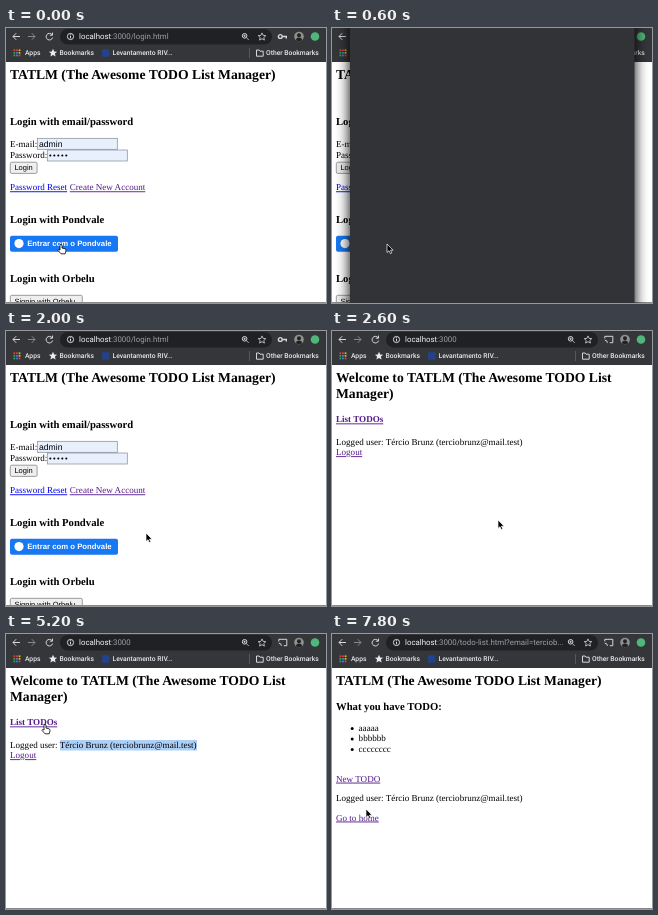
These frames come from a looping animation (320 by 275 pixels, 8 s). An HTML page:

```html
<!DOCTYPE html>
<html lang="en">
<head>
<meta charset="utf-8">
<title>TODO list demo</title>
<style>
html, body { margin: 0; width: 100%; height: 100%; overflow: hidden; background: #fff; }
svg { display: block; width: 100%; height: 100%; }
text { font: 9.07px "Liberation Serif", Times, serif; text-rendering: geometricPrecision; white-space: pre; }
.h2 { font-size: 13.63px; font-weight: bold; }
.h3 { font-size: 10.67px; font-weight: bold; }
.b { font-weight: bold; }
.link { fill: #551a8b; text-decoration: underline; text-decoration-thickness: .8px; }
.new { fill: #00e; }
.ui { font: 7.5px "Liberation Sans", Arial, sans-serif; }
.url { font: 7.85px Roboto, sans-serif; fill: #9aa0a6; }
.url tspan { fill: #f1f3f4; }
.mark { font: 500 6.75px Roboto, sans-serif; fill: #e8eaed; }
.icon { fill: none; stroke: #d5d7da; stroke-width: 1; }
.button { fill: #efefef; stroke: #767676; stroke-width: .7; }
.field { fill: #e8f0fe; stroke: #858a94; stroke-width: .7; }
#popup { filter: drop-shadow(0 0 7px #000); }
</style>
</head>
<body>
<svg viewBox="0 0 320 275" preserveAspectRatio="none">
  <rect width="320" height="275" fill="#fff"/>

  <!-- browser bars -->
  <rect width="320" height="34" fill="#35363a"/>
  <rect x="54" y="1" width="212" height="15.5" rx="7.7" fill="#202124"/>
  <g class="icon">
    <path d="M14 8.5H7M10.2 5.2L7 8.5l3.2 3.3"/>
    <path d="M22 8.5h7M25.8 5.2L29 8.5l-3.2 3.3" stroke="#85888d"/>
    <path d="M46 6.6A3.3 3.3 0 1 0 46.6 9.6M46.5 4.6V7.2H43.8"/>
    <circle cx="64.5" cy="8.5" r="3.1"/><path d="M64.5 8v2.4M64.5 6.3v1"/>
    <circle cx="238.6" cy="7.8" r="2.3"/><path d="M240.3 9.5l2.4 2.4M237.4 7.8h2.4M238.6 6.6v2.4" stroke-width=".8"/>
    <path d="M256 4.9l1.1 2.5 2.7.2-2 1.8.6 2.7-2.4-1.4-2.4 1.4.6-2.7-2-1.8 2.7-.2z" stroke-width=".8"/>
    <g id="key" stroke-width="1.4"><circle cx="274.3" cy="8.5" r="1.9"/><path d="M276.3 8.5h4v2"/></g>
    <path id="cast" d="M272.8 7.5V5.3h8v6.4h-3M272.8 9.2a2.6 2.6 0 0 1 2.6 2.6"/>
  </g>
  <circle cx="293" cy="8.5" r="4.8" fill="#8f908e"/>
  <path d="M290 12.2Q290 9.5 293 9.5T296 12.2Q293 14 290 12.2Z" fill="#222"/><circle cx="293" cy="7.3" r="2" fill="#222"/>
  <circle cx="309" cy="8.5" r="4.3" fill="#4fb779"/>
  <g id="apps"></g>
  <path d="M47 20.8l1.2 2.7 2.9.2-2.2 1.9.7 2.9-2.6-1.6-2.6 1.6.7-2.9-2.2-1.9 2.9-.2z" fill="#e8eaed"/>
  <rect x="96" y="21.3" width="7.4" height="7.4" fill="#24428a"/>
  <path class="icon" d="M250.5 22h2.5l1 1.2h3.2v5h-6.7z"/>
  <path d="M243.5 20v10" stroke="#5f6368" stroke-width=".8"/>
  <text class="mark" x="19" y="27.3">Apps</text>
  <text class="mark" x="53.5" y="27.3">Bookmarks</text>
  <text class="mark" x="106.5" y="27.3">Levantamento RIV...</text>
  <text class="mark" x="260" y="27.3">Other Bookmarks</text>
  <text class="url" x="73" y="11.3"><tspan>localhost</tspan>:3000<tspan id="path" style="fill:inherit"></tspan></text>

  <g id="login">
    <text class="h2" x="4" y="51.4">TATLM (The Awesome TODO List Manager)</text>
    <text class="h3" x="4" y="96.7">Login with email/password</text>
    <text x="4" y="118.7">E-mail:</text>
    <rect class="field" x="31.3" y="110.3" width="80" height="11"/>
    <text class="ui" x="33" y="118.6" style="font-size:8.6px">admin</text>
    <text x="4" y="130.3">Password:</text>
    <rect class="field" x="41.3" y="122" width="80" height="11"/>
    <text class="ui" x="43" y="130" style="letter-spacing:1.4px">•••••</text>
    <rect class="button" x="4.3" y="134.2" width="26.8" height="11.2" rx="1.5"/>
    <text class="ui" x="8.4" y="142.4">Login</text>
    <text class="link new" x="4" y="162.3">Password Reset</text>
    <text class="link" x="63.8" y="162.3">Create New Account</text>
    <text class="h3" x="4" y="194.7">Login with Pondvale</text>
    <rect x="4" y="207.7" width="108" height="16" rx="2" fill="#1877f2"/>
    <circle cx="13" cy="215.6" r="4.6" fill="#fff"/>
    <text class="ui" x="21.2" y="218.3" fill="#fff" style="font-size:7.75px;font-weight:bold">Entrar com o Pondvale</text>
    <text class="h3" x="4" y="254.2">Login with Orbelu</text>
    <rect class="button" x="4.3" y="267.3" width="72" height="11.2" rx="1.5"/>
    <text class="ui" x="8.4" y="275.6">Signin with Orbelu</text>
  </g>

  <g id="home">
    <text class="h2" x="4" y="51.4">Welcome to TATLM (The Awesome TODO List</text>
    <text class="h2" x="4" y="66.9">Manager)</text>
    <text class="link b" x="4" y="91.4">List TODOs</text>
    <rect id="selection" x="54" y="106" height="10.5" fill="#acd0f8"/>
    <text class="user" x="4" y="114.2"></text>
    <text class="link" x="4" y="124.2">Logout</text>
  </g>

  <g id="todos">
    <text class="h2" x="4" y="51.4">TATLM (The Awesome TODO List Manager)</text>
    <text class="h3" x="4" y="76">What you have TODO:</text>
    <g id="items"></g>
    <text class="link" x="4" y="147.6">New TODO</text>
    <text class="user" x="4" y="167"></text>
    <text class="link" x="4" y="186.5">Go to home</text>
  </g>

  <path d="M0 274.5h320" stroke="#8a8a8a"/>
  <rect id="popup" x="18" y="-30" width="284.5" height="335" fill="#313336"/>

  <g id="cursor" stroke-linejoin="round">
    <path id="arrow" d="M0 0V8.5L2 6.7 3.3 9.6 4.8 8.9 3.5 6.2H6.1Z" fill="#000" stroke="#fff" stroke-width=".7"/>
    <path id="hand" d="M-1 1Q0-.8 1 1V4L4 4.8Q5.2 5.3 5 6.8L4.2 9.8H0L-3 6.4Q-3 4.9-1 6Z" fill="#fff" stroke="#000" stroke-width=".8"/>
  </g>
</svg>
<script>
const $ = id => document.getElementById(id);
const show = (id, on) => $(id).style.display = on ? '' : 'none';

const hues = ['#ea4335', '#ea4335', '#fbbc04', '#34a853', '#4285f4', '#fbbc04', '#34a853', '#4285f4', '#ea4335'];
$('apps').innerHTML = hues.map((hue, i) =>
  `<rect x="${7.5 + i % 3 * 2.6}" y="${21.4 + (i / 3 | 0) * 2.6}" width="1.7" height="1.7" fill="${hue}"/>`).join('');
$('items').innerHTML = ['aaaaa', 'bbbbbb', 'cccccccc'].map((item, i) =>
  `<circle cx="20.2" cy="${94.6 + i * 10.4}" r="1.5"/><text x="26.6" y="${97 + i * 10.4}">${item}</text>`).join('');
for (const el of document.querySelectorAll('.user'))
  el.textContent = 'Logged user: Tércio Brunz (terciobrunz@mail.test)';

const paths = { login: '/login.html', home: '', todos: '/todo-list.html?email=terciob...' };

// cursor stops: time, x, y
const stops = [
  [0, 55, 216], [1200, 55, 216], [2000, 140, 202], [2600, 166, 189], [2800, 166, 189],
  [3400, 53, 108], [4000, 274, 107], [4200, 274, 107], [4600, 160, 141], [5200, 39, 90],
  [6200, 39, 90], [6600, 52, 108], [7200, 104, 150], [7800, 34, 175], [8000, 34, 175]
];

function cursorAt(t) {
  const i = stops.findIndex(s => s[0] > t);
  const [t0, x0, y0] = stops[i - 1], [t1, x1, y1] = stops[i];
  const k = (t - t0) / (t1 - t0);
  return [x0 + (x1 - x0) * k, y0 + (y1 - y0) * k];
}

function draw(now) {
  const t = Math.floor(now % 8000 / 200) * 200;
  const page = t < 2400 ? 'login' : t < 5600 ? 'home' : 'todos';
  for (const id in paths) show(id, id === page);
  $('path').textContent = paths[page];
  show('key', page === 'login');
  show('cast', page !== 'login');

  const open = t >= 200 && t < 1000;
  show('popup', open);
  $('popup').setAttribute('opacity', Math.min(1, t / 400 * .9));

  const [x, y] = cursorAt(t);
  $('cursor').setAttribute('transform', `translate(${x} ${y})`);
  const hand = !open && (t <= 1200 || t >= 5200 && t <= 6200);
  show('hand', hand);
  show('arrow', !hand);

  const width = t < 3400 ? 0 : t < 4000 ? Math.max(0, Math.min(137, x - 54)) : 137;
  $('selection').setAttribute('width', width);
}

const start = performance.now();
function tick() {
  draw(performance.now() - start);
  requestAnimationFrame(tick);
}
tick();
</script>
</body>
</html>
```
